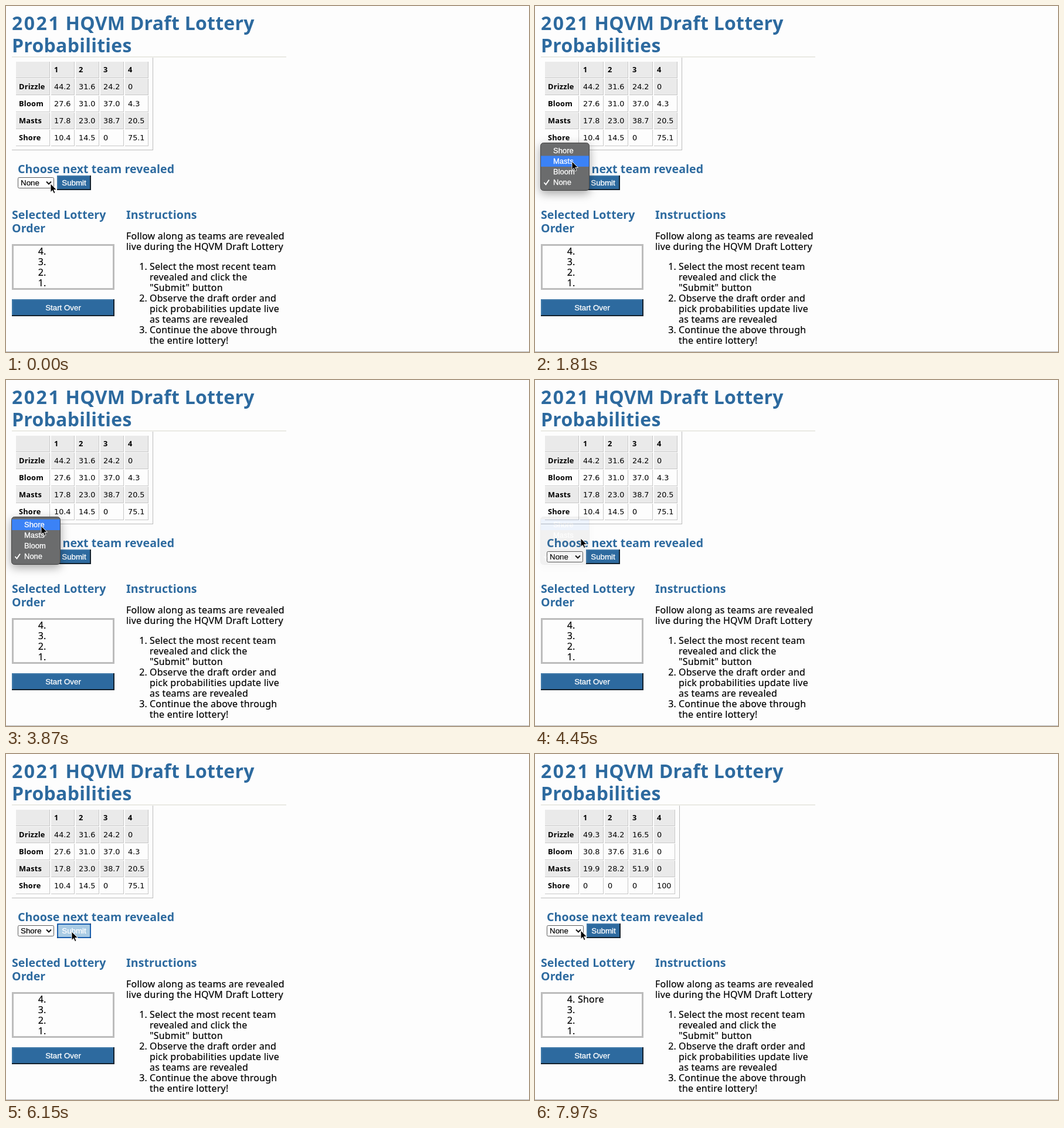
Animation of 892x590 px, one loop 8 s. Source, as an HTML page:

```html
<!DOCTYPE html>
<html lang="en">
<head>
<meta charset="utf-8">
<title>Draft Lottery Probabilities</title>
<style>
  html, body { margin: 0; width: 100%; height: 100%; overflow: hidden; background: #fdfdfd; }
  svg { display: block; }
  text { font: 16px "Noto Sans", sans-serif; letter-spacing: .2px; white-space: pre;
         stroke: #000; stroke-width: .2px; }
  .h1, .h2 { font-weight: 700; fill: #2d6a9f; stroke: none; }
  .h1 { font-size: 32px; letter-spacing: .25px; }
  .h2 { font-size: 19.6px; letter-spacing: .07px; }
  .year { letter-spacing: 2.5px; }
  .label { font-size: 12.8px; font-weight: 700; stroke: none; }
  .num { font: 12.8px "DejaVu Sans", sans-serif; letter-spacing: 0; stroke: none; }
  .ui { font: 13.33px "Liberation Sans", Arial, sans-serif; letter-spacing: 0; }
  .item { font: 13px "Liberation Sans", Arial, sans-serif; letter-spacing: 0; }
  .end { text-anchor: end; }
  .mid { text-anchor: middle; }
  .white { fill: #fff; stroke: #fff; stroke-width: .3px; }
  #menu { filter: drop-shadow(0 5px 8px rgba(0, 0, 0, .35)); }
</style>
</head>
<body>
<svg id="stage" width="892" height="590" viewBox="0 0 892 590"></svg>
<script>
const LOOP = 8000, MENU_OPEN = 600, MENU_FADE = 4280, MENU_GONE = 4465,
      PRESS = 5950, REVEAL = 6850;
const BLUE = '#2d6a9f', STRIPE = '#eaeaea', GRAY = '#bcbcbc';
const TEAMS = ['Drizzle', 'Bloom', 'Masts', 'Shore'];
const BEFORE = ['44.2 31.6 24.2 0', '27.6 31.0 37.0 4.3', '17.8 23.0 38.7 20.5', '10.4 14.5 0 75.1'];
const AFTER = ['49.3 34.2 16.5 0', '30.8 37.6 31.6 0', '19.9 28.2 51.9 0', '0 0 0 100'];
const PICK = 'Shore';

const text = (x, y, s, cls = '') => `<text x="${x}" y="${y}" class="${cls}">${s}</text>`;
const rect = (x, y, w, h, fill, extra = '') =>
  `<rect x="${x}" y="${y}" width="${w}" height="${h}" fill="${fill}" ${extra}/>`;
const path = (d, stroke, width = 1) =>
  `<path d="${d}" fill="none" stroke="${stroke}" stroke-width="${width}"/>`;
const lines = (x, y, step, list, cls) => list.map((s, i) => text(x, y + i * step, s, cls)).join('');

function bevelButton(x, y, w, h, label, fill = BLUE) {
  return rect(x, y, w, h, fill) +
    path(`M${x + 1} ${y + h}V${y + 1}H${x + w}`, '#3f78a8', 2) +
    path(`M${x} ${y + h - 1}H${x + w - 1}V${y}`, '#15222e', 2) +
    text(x + w / 2, y + h / 2 + 4.5, label, 'ui mid white');
}

function table(values, lastWidth) {
  const right = 210.5 + lastWidth;
  let out = path(`M10 245.5H${right - .5}M${right} 88V246`, GRAY);
  for (let row = 0; row < 5; row++) {
    const y = 95 + row * 29;
    const cells = row
      ? [TEAMS[row - 1], ...values[row - 1].split(' ')]
      : ['', '1', '2', '3', '4'];
    cells.forEach((s, col) => {
      const x = col ? 35 + col * 42 : 17;
      const w = col === 0 ? 58 : col === 4 ? lastWidth : 40;
      if ([0, 1, 3].includes(row)) out += rect(x, y, w, 27, STRIPE);
      out += path(`M${x} ${y + 27.5}H${x + w}M${x + w - .5} ${y}V${y + 28}`, '#c8c8c8');
      out += text(x + 5, y + 18, s, row && col ? 'num' : 'label');
    });
  }
  return out;
}

const page =
  text(10, 41, '2021', 'h1 year') +
  text(101.5, 41, 'HQVM Draft Lottery', 'h1') +
  text(10, 79, 'Probabilities', 'h1') +
  rect(10, 86, 468, 1.5, '#e4e4dc') +
  text(20, 285, 'Choose next team revealed', 'h2') +
  lines(10, 363, 23, ['Selected Lottery', 'Order'], 'h2') +
  text(205, 363, 'Instructions', 'h2') +
  lines(205, 398, 18, ['Follow along as teams are revealed', 'live during the HQVM Draft Lottery']) +
  lines(245, 450, 18, ['Select the most recent team', 'revealed and click the', '"Submit" button',
    'Observe the draft order and', 'pick probabilities update live', 'as teams are revealed',
    'Continue the above through', 'the entire lottery!']) +
  lines(241, 450, 54, ['1.', '2.', '3.'], 'end') +
  rect(11.5, 407.5, 172, 75, 'none', `stroke="${GRAY}" stroke-width="3"`) +
  lines(68.5, 424, 18, ['4.', '3.', '2.', '1.'], 'end') +
  bevelButton(10, 500, 175, 29, 'Start Over') +
  rect(0, 589, 892, 1, '#b4b4b4');

const menu =
  rect(9.5, 233.5, 83, 81, '#6b6c6d', 'rx="5" stroke="#444"') +
  '<rect id="highlight" x="10" width="82" height="18.5" fill="#3b82f6"/>' +
  lines(31, 251, 18, [PICK, 'Masts', 'Bloom', 'None'], 'item white') +
  path('M15.5 301L18.5 304.5L24 296.5', '#fff', 1.9);

document.getElementById('stage').innerHTML =
  page +
  `<g id="before">${table(BEFORE, 40)}</g>` +
  `<g id="after">${table(AFTER, 36)}${text(73, 424, PICK)}</g>` +
  '<g id="form"></g>' +
  `<g id="menu">${menu}</g>` +
  '<path id="cursor" d="M0 0V14.5L3.3 11.4L5.6 16.6L8 15.6L5.7 10.5H10.4Z" fill="#000" stroke="#fff" stroke-width=".9"/>';

const el = id => document.getElementById(id);
const show = (id, on) => { el(id).style.display = on ? '' : 'none'; };

// Pointer stops: time, x, y
const STOPS = [
  [0, 76, 303], [600, 76, 303], [1000, 70, 295], [1250, 70, 295], [1780, 63, 265],
  [2500, 63, 265], [3300, 60, 249], [4200, 60, 249], [4450, 78, 270],
  [5500, 112, 303], [6950, 112, 303], [7600, 78, 301], [LOOP, 78, 301]
];

function pointerAt(t) {
  const i = STOPS.findIndex(s => s[0] > t);
  const [t0, x0, y0] = STOPS[i - 1], [t1, x1, y1] = STOPS[i];
  const u = (t - t0) / (t1 - t0), k = u * u * (3 - 2 * u);
  return [x0 + (x1 - x0) * k, y0 + (y1 - y0) * k];
}

function form(choice, shift, hover, focus) {
  const x = 87 + shift;
  const select = rect(20.5, 292.5, 61 + shift, 18, '#fff', 'rx="2" stroke="#5c5c5c"') +
    text(25, 306, choice, 'ui') +
    path(`M${69 + shift} 299.5l4 4l4 -4`, '#111', 2);
  const button = bevelButton(x, 289, 58, 25, 'Submit', hover ? '#a9cbe4' : BLUE);
  const ring = focus ? rect(x + 1, 290, 56, 23, 'none', 'rx="2" stroke="#1b5fae" stroke-width="2"') : '';
  return select + button + ring;
}

let formState = '';
function draw(now) {
  const t = now % LOOP, [x, y] = pointerAt(t);
  const revealed = t >= REVEAL, shift = revealed ? 1 : 0;
  show('before', !revealed);
  show('after', revealed);

  const choice = t >= MENU_GONE && !revealed ? PICK : 'None';
  const hover = x > 87 + shift && x < 145 + shift && y > 289 && y < 314;
  const markup = form(choice, shift, hover, t >= PRESS && !revealed);
  if (markup !== formState) el('form').innerHTML = formState = markup;

  show('menu', t >= MENU_OPEN && t < MENU_GONE);
  el('menu').style.opacity = Math.min(1, (MENU_GONE - t) / (MENU_GONE - MENU_FADE));
  const row = t >= MENU_FADE ? 0 : Math.max(0, Math.min(3, Math.floor((y - 237) / 18)));
  el('highlight').setAttribute('y', 237.5 + row * 18);

  el('cursor').setAttribute('transform', `translate(${x} ${y})`);
  requestAnimationFrame(draw);
}
requestAnimationFrame(draw);
</script>
</body>
</html>
```
